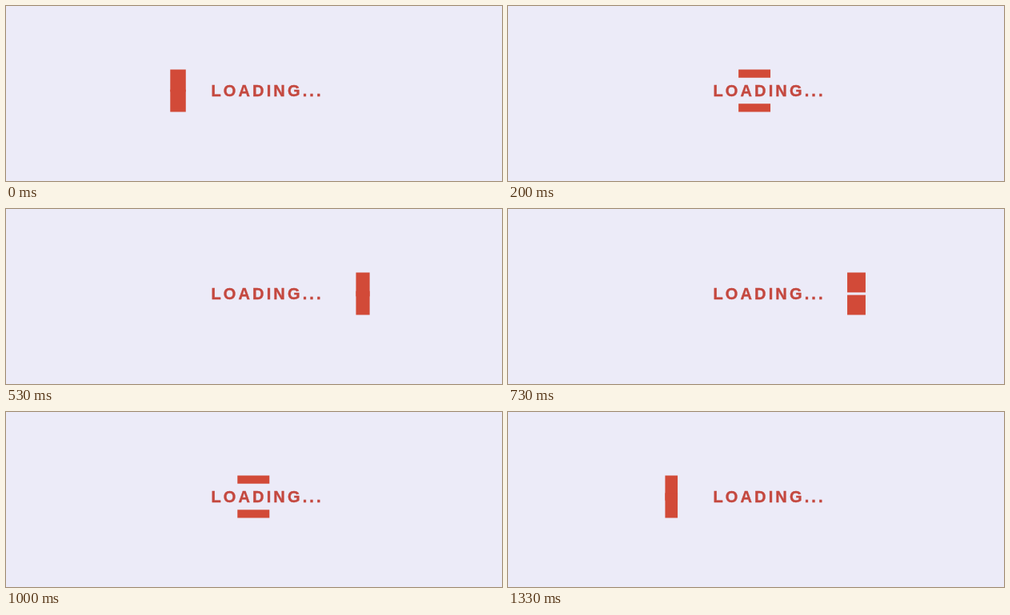
An HTML page with a canvas that plays this animation: 620x219 px, repeating every 1.39 s.

```html
<!DOCTYPE html>
<html lang="en">
<head>
<meta charset="utf-8">
<title>Loading</title>
<style>
  html, body { margin: 0; width: 100%; height: 100%; overflow: hidden; background: #ecebf8; }
  canvas { display: block; }
</style>
</head>
<body>
<canvas id="stage" width="620" height="219"></canvas>
<script>
const ctx = document.getElementById('stage').getContext('2d');

const LOOP = 1390;          // ms on screen per loop
const STEP = 200 / 3;       // ms between poses
const STEPS = 21;
const SWEEP = 700;          // ms for one crossing
const LEAD = 99;            // ms already elapsed in the crossing at time 0

const TOP = 79.5, BOTTOM = 132.5;
const LEFT = { from: 195.4, to: 442 };
const WIDTH = { end: 15.2, middle: 41 };
const HEIGHT = { end: 31.5, middle: 9.3 };

const mix = (a, b, t) => a + (b - a) * t;

// cubic-bezier(.42, 0, .58, 1)
function easeInOut(x) {
  let low = 0, high = 1, s = 0.5;
  for (let i = 0; i < 24; i++) {
    s = (low + high) / 2;
    const at = 3 * s * (1 - s) * (0.42 * (1 - s) + 0.58 * s) + s ** 3;
    if (at < x) low = s; else high = s;
  }
  return s * s * (3 - 2 * s);
}

// Poses begin on times rounded to 10 ms.
function poseTime(ms) {
  let n = STEPS - 1;
  while (n > 0 && Math.round(n * STEP / 10) * 10 > ms) n--;
  return n * STEP;
}

function drawText() {
  ctx.font = 'bold 20px "Liberation Sans", Arial, sans-serif';
  ctx.letterSpacing = '3.13px';
  ctx.fillStyle = ctx.strokeStyle = '#c4483f';
  ctx.lineWidth = 0.4;
  ctx.fillText('LOADING...', 256.5, 113);
  ctx.strokeText('LOADING...', 256.5, 113);
}

function drawBars(ms) {
  const turn = (ms + LEAD) / SWEEP % 2;
  const p = turn > 1 ? 2 - turn : turn;
  const stretch = easeInOut(p < 0.5 ? p * 2 : 2 - p * 2);
  const x = mix(LEFT.from, LEFT.to, easeInOut(p));
  const w = mix(WIDTH.end, WIDTH.middle, stretch);
  const h = mix(HEIGHT.end, HEIGHT.middle, stretch);
  ctx.fillStyle = '#d24a38';
  ctx.fillRect(x, TOP, w, h);
  ctx.fillRect(x, BOTTOM - h, w, h);
}

function draw(now) {
  ctx.fillStyle = '#ecebf8';
  ctx.fillRect(0, 0, 620, 219);
  drawText();
  drawBars(poseTime(now % LOOP));
}

let start;
function tick(now) {
  start ??= now;
  draw(now - start);
  requestAnimationFrame(tick);
}
draw(0);
requestAnimationFrame(tick);
</script>
</body>
</html>
```
